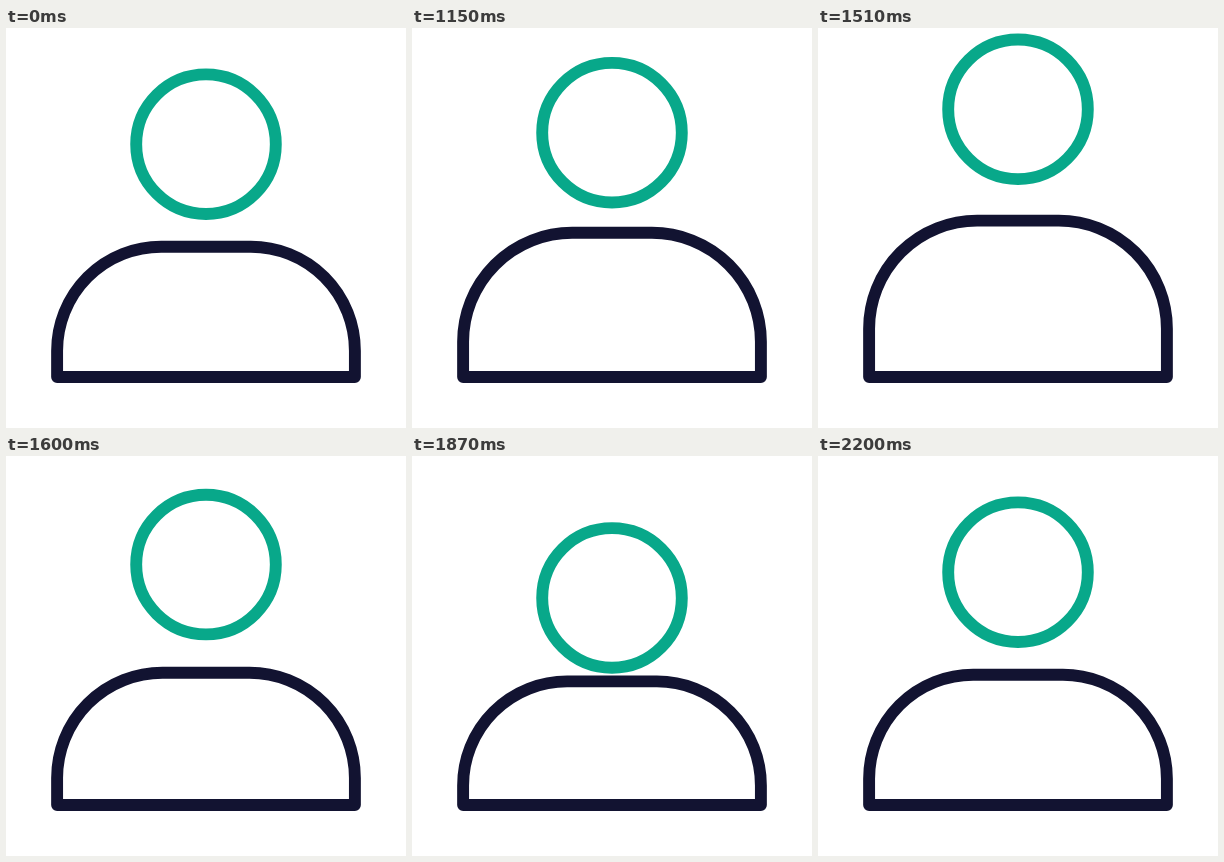
Write an HTML page with a canvas that moves like this. It is 400x400 px and loops after 2230 ms.

```html
<!DOCTYPE html>
<html lang="en">
<head>
<meta charset="utf-8">
<title>Avatar hop</title>
<style>
  html, body { margin: 0; width: 100%; height: 100%; overflow: hidden; background: #fff; }
  canvas { display: block; width: 400px; height: 400px; }
</style>
</head>
<body>
<canvas id="stage" width="400" height="400"></canvas>
<script>
const ctx = document.getElementById('stage').getContext('2d');
const LOOP = 2230, HOLD = 1030, STEP = 30;
const LEFT = 51.1, RIGHT = 348.9, BASE = 349;

// Each key is [time, value]; values ease in and out between keys.
const headY = [[1000, 116.2], [1443, 73], [1765, 147], [2175, 116.2]];
const shoulderY = [[1000, 212.3], [1443, 184], [1680, 228.5], [2185, 218.7]];
const shoulderRadius = [[1443, 109], [1680, 104]];

function valueAt(keys, time) {
  if (time <= keys[0][0]) return keys[0][1];
  for (let i = 1; i < keys.length; i++) {
    const [start, from] = keys[i - 1], [end, to] = keys[i];
    if (time < end) {
      const p = (time - start) / (end - start);
      return from + (to - from) * p * p * (3 - 2 * p);
    }
  }
  return keys[keys.length - 1][1];
}

function drawHead(y) {
  ctx.strokeStyle = '#08a88a';
  ctx.beginPath();
  ctx.arc(200, y, 69.8, 0, Math.PI * 2);
  ctx.stroke();
}

function drawBody(top, radius) {
  ctx.strokeStyle = '#121331';
  ctx.beginPath();
  ctx.moveTo(LEFT, BASE);
  ctx.arcTo(LEFT, top, 200, top, radius);
  ctx.arcTo(RIGHT, top, RIGHT, BASE, radius);
  ctx.lineTo(RIGHT, BASE);
  ctx.closePath();
  ctx.stroke();
}

function draw(elapsed) {
  const time = elapsed % LOOP;
  const resting = time < HOLD;
  const tick = HOLD + Math.floor((time - HOLD) / STEP) * STEP;

  ctx.fillStyle = '#fff';
  ctx.fillRect(0, 0, 400, 400);
  ctx.lineWidth = 11.9;
  ctx.lineJoin = 'round';
  drawHead(resting ? 116.2 : valueAt(headY, tick));
  // The shoulders snap to a taller shape as the hop begins.
  if (resting) drawBody(218.7, 104);
  else drawBody(valueAt(shoulderY, tick), valueAt(shoulderRadius, tick));
}

const started = performance.now();
function frame() {
  draw(performance.now() - started);
  requestAnimationFrame(frame);
}
frame();
</script>
</body>
</html>
```
